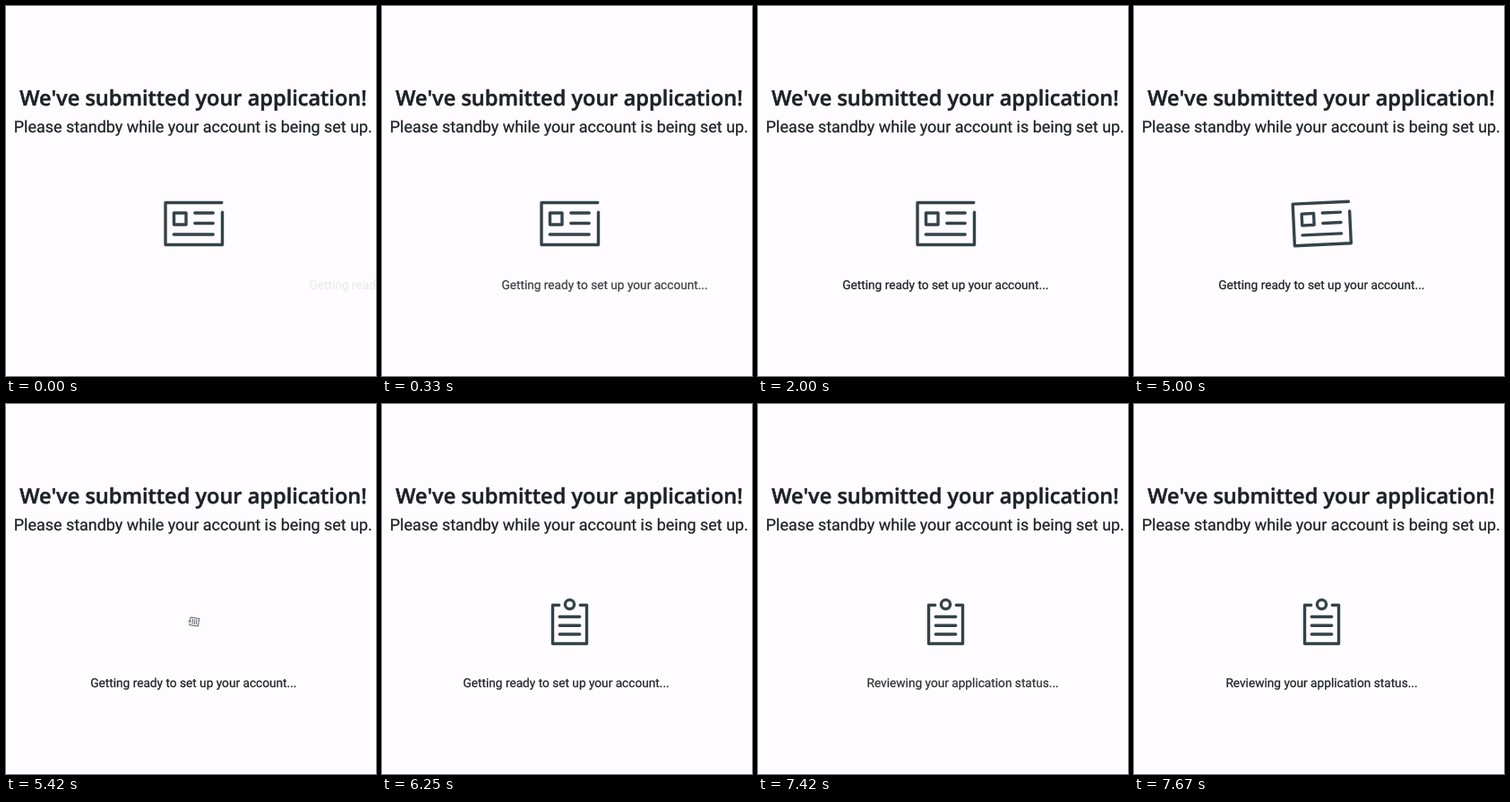
Write an HTML page that moves like this. It is 413 by 413 pixels and loops after 8 s.

```html
<!DOCTYPE html>
<html lang="en">
<head>
<meta charset="utf-8">
<title>Account set-up</title>
<style>
  html, body { margin: 0; width: 100%; height: 100%; overflow: hidden; background: #fefcfe; }
  svg { display: block; width: 100vw; height: 100vh; }
  text {
    text-anchor: middle; text-rendering: geometricPrecision; font-family: Roboto, sans-serif;
    fill: #1b2126; stroke: #1b2126; stroke-width: .25; stroke-linejoin: round;
  }
  .title { font: 600 23.55px "Open Sans", "Noto Sans", sans-serif; stroke-width: .5; }
  .sub { font-size: 17.95px; }
  .status { font-size: 13.68px; }
  .icon { fill: none; stroke: #34434a; stroke-width: 3.4; stroke-linejoin: round; stroke-linecap: round; }
</style>
</head>
<body>
<svg viewBox="0 0 413 413">
  <text class="title" x="209" y="110.5">We've submitted your application!</text>
  <text class="sub" x="208.8" y="141.2">Please standby while your account is being set up.</text>
  <g class="icon" id="card">
    <path d="M240.8 219.5H178V266.5H241.5V230.3"/>
    <rect x="187.5" y="231" width="13.5" height="13"/>
    <path d="M210.8 231H231.2M210.8 242.5H231.2M187.3 255H231.2"/>
  </g>
  <g class="icon" id="board">
    <path d="M197.7 224.5H190.5V267.5H228.5V224.5H221.3"/>
    <circle cx="209.5" cy="223.7" r="5.1"/>
    <path d="M198.3 237.5H220.7M198.3 247.3H220.7M198.3 257H220.7"/>
  </g>
  <text class="status" id="ready" y="315.6">Getting ready to set up your account...</text>
  <text class="status" id="review" y="315.6">Reviewing your application status...</text>
</svg>
<script>
const LOOP = 8000, FPS = 12, MID = 209.3, SLIDE = 265, SLIDE_MS = 750;
const SPIN_START = 4965, SPIN_MID = 5370, SPIN_END = 5755;
const LEAVE = 6230, NEXT = LEAVE + SLIDE_MS;
const $ = id => document.getElementById(id);
const card = $("card"), board = $("board"), ready = $("ready"), review = $("review");

const span = (t, from, to) => Math.min(1, Math.max(0, (t - from) / (to - from)));
const easeOut = u => 1 - (1 - u) ** 3;

// cubic-bezier(.25, .1, .25, 1)
function ease(x) {
  const curve = (s, a, b) => 3 * s * (1 - s) ** 2 * a + 3 * s * s * (1 - s) * b + s ** 3;
  let lo = 0, hi = 1;
  for (let i = 0; i < 24; i++) {
    const s = (lo + hi) / 2;
    if (curve(s, .25, .25) < x) lo = s; else hi = s;
  }
  return curve(lo, .1, 1);
}

// shift: -1 is fully out to the left, 0 at rest, 1 out to the right
function slide(label, shift) {
  label.setAttribute("x", MID + SLIDE * shift);
  label.setAttribute("opacity", 1 - Math.abs(shift));
}

function spin(icon, turn, scale) {
  icon.setAttribute("visibility", scale > 0 ? "visible" : "hidden");
  icon.setAttribute("transform",
    `translate(209.5 243) rotate(${turn * 360}) scale(${scale}) translate(-209.5 -243)`);
}

function draw(time) {
  const t = Math.floor((time % LOOP + 6.7) * FPS / 1000) * 1000 / FPS;
  const enter = start => 1 - easeOut(span(t, start, start + SLIDE_MS));
  slide(ready, t < LEAVE ? enter(-20) : -ease(span(t, LEAVE, NEXT)));
  slide(review, enter(NEXT));

  const out = span(t, SPIN_START, SPIN_MID) ** 2;
  const left = (1 - span(t, SPIN_MID, SPIN_END)) ** 2;
  spin(card, -out, 1 - out);
  spin(board, left, 1 - left);
}

const begin = performance.now();
function tick() {
  draw(performance.now() - begin);
  requestAnimationFrame(tick);
}
tick();
</script>
</body>
</html>
```
